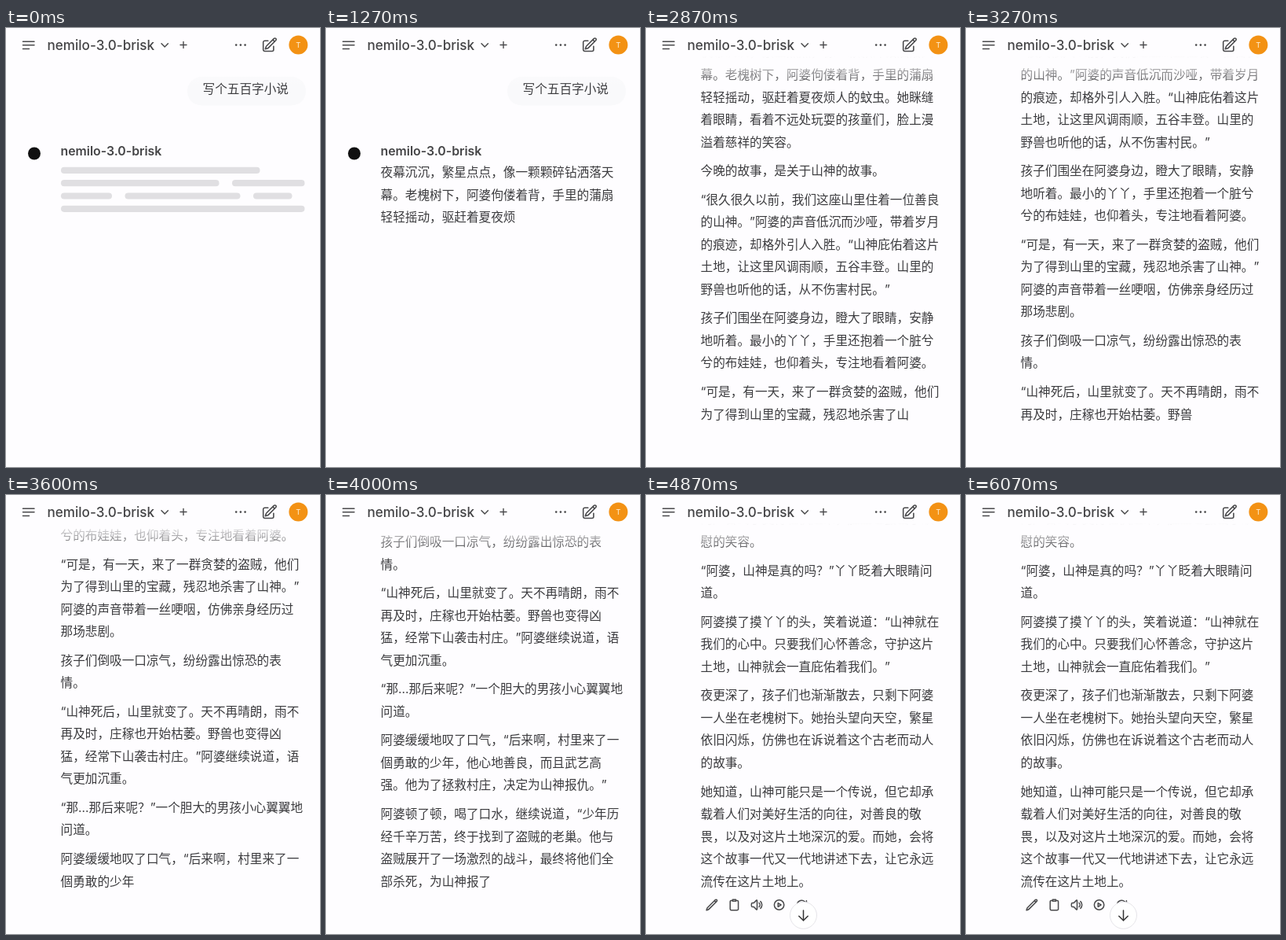
Recreate the animation shown at these times as an HTML page with a canvas. Size 400 by 558 pixels, loop 6140 ms.

```html
<!DOCTYPE html>
<html lang="zh-CN">
<head>
<meta charset="utf-8">
<title>Chat</title>
<style>
html, body { margin: 0; width: 100%; height: 100%; overflow: hidden; background: #fefdff; }
canvas { display: block; width: 400px; height: 558px; }
</style>
</head>
<body>
<canvas id="stage"></canvas>
<script>
const W = 400, H = 558, LOOP = 6140, TICK = 1000 / 15;
const BG = '#fefdff', INK = '#3b3b3e';
const MODEL = 'nemilo-3.0-brisk';
const SANS = 'Inter, "Noto Sans CJK SC", "Noto Sans CJK", sans-serif';
const LINE = 28.52, PARA = 36.6, FIRST = 184, LAST = 491.5;

const story = `夜幕沉沉，繁星点点，像一颗颗碎钻洒落天
幕。老槐树下，阿婆佝偻着背，手里的蒲扇
轻轻摇动，驱赶着夏夜烦人的蚊虫。她眯缝
着眼睛，看着不远处玩耍的孩童们，脸上漫
溢着慈祥的笑容。

今晚的故事，是关于山神的故事。

“很久很久以前，我们这座山里住着一位善良
的山神。”阿婆的声音低沉而沙哑，带着岁月
的痕迹，却格外引人入胜。“山神庇佑着这片
土地，让这里风调雨顺，五谷丰登。山里的
野兽也听他的话，从不伤害村民。”

孩子们围坐在阿婆身边，瞪大了眼睛，安静
地听着。最小的丫丫，手里还抱着一个脏兮
兮的布娃娃，也仰着头，专注地看着阿婆。

“可是，有一天，来了一群贪婪的盗贼，他们
为了得到山里的宝藏，残忍地杀害了山神。”
阿婆的声音带着一丝哽咽，仿佛亲身经历过
那场悲剧。

孩子们倒吸一口凉气，纷纷露出惊恐的表
情。

“山神死后，山里就变了。天不再晴朗，雨不
再及时，庄稼也开始枯萎。野兽也变得凶
猛，经常下山袭击村庄。”阿婆继续说道，语
气更加沉重。

“那...那后来呢？”一个胆大的男孩小心翼翼地
问道。

阿婆缓缓地叹了口气，“后来啊，村里来了一
個勇敢的少年，他心地善良，而且武艺高
强。他为了拯救村庄，决定为山神报仇。”

阿婆顿了顿，喝了口水，继续说道，“少年历
经千辛万苦，终于找到了盗贼的老巢。他与
盗贼展开了一场激烈的战斗，最终将他们全
部杀死，为山神报了仇。”

孩子们听得热血沸腾，恨不得自己就是那个
勇敢的少年。

“盗贼死后，山神也得以安息。他重新守护着
这片土地，山里又恢复了往日的生机。”阿婆
的声音终于变得轻快起来，脸上也露出了欣
慰的笑容。

“阿婆，山神是真的吗？”丫丫眨着大眼睛问
道。

阿婆摸了摸丫丫的头，笑着说道：“山神就在
我们的心中。只要我们心怀善念，守护这片
土地，山神就会一直庇佑着我们。”

夜更深了，孩子们也渐渐散去，只剩下阿婆
一人坐在老槐树下。她抬头望向天空，繁星
依旧闪烁，仿佛也在诉说着这个古老而动人
的故事。

她知道，山神可能只是一个传说，但它却承
载着人们对美好生活的向往，对善良的敬
畏，以及对这片土地深沉的爱。而她，会将
这个故事一代又一代地讲述下去，让它永远
流传在这片土地上。`;

// Lay out lines: text, index of the first character, vertical centre
const lines = [];
let total = 0, nextY = FIRST;
for (const para of story.split('\n\n')) {
  for (const text of para.split('\n')) {
    lines.push({ text, start: total, y: nextY });
    total += text.length;
    nextY += LINE;
  }
  nextY += PARA - LINE;
}

// Typing progress: up to each phrase, at which tick
const upTo = phrase => {
  const i = story.indexOf(phrase) + phrase.length;
  return story.slice(0, i).replace(/\n/g, '').length;
};
const progress = [
  [11, 0],
  [19, upTo('驱赶着夏夜烦')],
  [30, upTo('低沉而沙哑，带着岁')],
  [36, upTo('从不伤害村民。”')],
  [49, upTo('庄稼也开始枯萎。野兽')],
  [60, upTo('部杀死，为山神报了')],
  [68, upTo('笑着说道：“山')],
  [72, total]
];
const DONE = 73;

function typed(tick) {
  if (tick <= progress[0][0]) return 0;
  for (let i = 1; i < progress.length; i++) {
    const [a, n] = progress[i - 1], [b, m] = progress[i];
    if (tick <= b) return Math.round(n + (m - n) * (tick - a) / (b - a));
  }
  return total;
}

const icons = {
  compose: 'm16.862 4.487 1.687-1.688a1.875 1.875 0 1 1 2.652 2.652L10.582 16.07a4.5 4.5 0 0 1-1.897 1.13L6 18l.8-2.685a4.5 4.5 0 0 1 1.13-1.897l8.932-8.931Zm0 0L19.5 7.125M18 14v4.75A2.25 2.25 0 0 1 15.75 21H5.25A2.25 2.25 0 0 1 3 18.75V8.25A2.25 2.25 0 0 1 5.25 6H10',
  pencil: 'm16.862 4.487 1.687-1.688a1.875 1.875 0 1 1 2.652 2.652L6.832 19.82a4.5 4.5 0 0 1-1.897 1.13l-2.685.8.8-2.685a4.5 4.5 0 0 1 1.13-1.897L16.863 4.487Zm0 0L19.5 7.125',
  clipboard: 'M8.3 4H6.5a2 2 0 0 0-2 2v13.5a2.25 2.25 0 0 0 2.25 2.25h10.5a2.25 2.25 0 0 0 2.25-2.25V6a2 2 0 0 0-2-2h-1.8M9 2.25h6v3H9Z',
  speaker: 'M19.114 5.636a9 9 0 0 1 0 12.728M16.463 8.288a5.25 5.25 0 0 1 0 7.424M6.75 8.25l4.72-4.72a.75.75 0 0 1 1.28.53v15.88a.75.75 0 0 1-1.28.53l-4.72-4.72H4.5a2 2 0 0 1-1.9-1.35a9 9 0 0 1 0-4.8a2 2 0 0 1 1.9-1.35Z',
  play: 'M21 12a9 9 0 1 1-18 0a9 9 0 1 1 18 0ZM10 8.5v7l5.5-3.5Z',
  redo: 'M16.023 9.348h4.992M2.985 19.644v-4.992h4.992m-4.993 0 3.181 3.183a8.25 8.25 0 0 0 13.803-3.7M4.031 9.865a8.25 8.25 0 0 1 13.803-3.7l3.181 3.182m0-4.991v4.99'
};
for (const k in icons) icons[k] = new Path2D(icons[k]);

const canvas = document.getElementById('stage');
const ratio = window.devicePixelRatio || 1;
canvas.width = W * ratio;
canvas.height = H * ratio;
const c = canvas.getContext('2d');
c.lineCap = c.lineJoin = 'round';

function label(text, x, y, font, color = INK, align = 'left') {
  c.font = font + ' ' + SANS;
  c.fillStyle = color;
  c.textAlign = align;
  c.fillText(text, x, y);
}

function disc(x, y, r, color) {
  c.fillStyle = color;
  c.beginPath();
  c.arc(x, y, r, 0, Math.PI * 2);
  c.fill();
}

function pill(x, y, w, h, color) {
  c.fillStyle = color;
  c.beginPath();
  c.roundRect(x, y, w, h, h / 2);
  c.fill();
}

function stroke(points, width, color = '#4a4a4c') {
  c.strokeStyle = color;
  c.lineWidth = width;
  c.beginPath();
  points.forEach(([x, y], i) => i ? c.lineTo(x, y) : c.moveTo(x, y));
  c.stroke();
}

function icon(name, x, y, scale, width) {
  c.save();
  c.translate(x, y);
  c.scale(scale, scale);
  c.translate(-12, -12);
  c.strokeStyle = '#4a4a4c';
  c.lineWidth = width;
  c.stroke(icons[name]);
  c.restore();
}

function skeleton(t) {
  const phase = t / 2000 % 1;
  c.globalAlpha = 0.75 + 0.25 * Math.cos(phase * Math.PI * 2);
  const rows = [[[70, 323.5]], [[70, 271.5], [288, 380.5]],
    [[70, 135], [151.5, 298.5], [315, 364.5]], [[70, 380.5]]];
  rows.forEach((row, i) => row.forEach(([a, b]) =>
    pill(a, 176.8 + i * 16.3, b - a, 8.2, '#e0dfe2')));
  c.globalAlpha = 1;
}

function chat(t, tick) {
  const count = typed(tick);
  const shown = lines.filter(l => l.start < count);
  const scroll = shown.length ? Math.max(0, shown[shown.length - 1].y - LAST) : 0;
  c.save();
  c.translate(0, -scroll);
  pill(231, 62, 151, 36.5, '#f9f9fb');
  label('写个五百字小说', 250.5, 82.6, '15.63px');
  disc(36, 159.5, 8, '#111');
  label(MODEL, 69.5, 162.3, '600 15.85px', '#444446');
  if (!count) skeleton(t);
  for (const l of shown) {
    if (l.y - scroll > 20) label(l.text.slice(0, count - l.start), 69.5, l.y + 5.1, '15.63px');
  }
  c.restore();
}

function header() {
  const fade = c.createLinearGradient(0, 36, 0, 74);
  fade.addColorStop(0, BG);
  fade.addColorStop(1, 'rgba(254,253,255,0)');
  c.fillStyle = fade;
  c.fillRect(0, 0, W, 74);

  stroke([[21.5, 17.2], [36, 17.2]], 1.5);
  stroke([[21.5, 21.8], [36, 21.8]], 1.5);
  stroke([[21.5, 26.4], [29.5, 26.4]], 1.5);
  label(MODEL, 52.5, 27.6, '500 17.1px', '#444446');
  stroke([[198, 19.8], [202.2, 24], [206.4, 19.8]], 1.5);
  stroke([[222, 21.5], [230, 21.5]], 1.4);
  stroke([[226, 17.5], [226, 25.5]], 1.4);
  for (const x of [293.2, 298.9, 304.6]) disc(x, 21.6, 1.3, '#4a4a4c');
  icon('compose', 335.6, 21.5, 0.88, 1.8);
  disc(372.4, 21.6, 12, '#f39214');
  label('T', 372.4, 25, '9.5px', '#fff3dc', 'center');
}

function actions() {
  ['pencil', 'clipboard', 'speaker', 'play', 'redo'].forEach((name, i) =>
    icon(name, 83.8 + i * 28.6, 521, 0.69, 2.2));
  disc(200.5, 534.3, 17, '#fff');
  c.strokeStyle = '#e6e5e9';
  c.lineWidth = 1;
  c.stroke();
  stroke([[200.5, 528], [200.5, 540.8]], 1.5, '#333');
  stroke([[194.8, 535.2], [200.5, 540.8], [206.2, 535.2]], 1.5, '#333');
}

function draw(now) {
  const t = now % LOOP;
  const tick = Math.floor(t / TICK + 0.1);
  c.setTransform(ratio, 0, 0, ratio, 0, 0);
  c.fillStyle = BG;
  c.fillRect(0, 0, W, H);
  chat(tick * TICK, tick);
  if (tick >= DONE) actions();
  header();
}

const begin = performance.now();
function loop() {
  draw(performance.now() - begin);
  requestAnimationFrame(loop);
}
loop();
</script>
</body>
</html>
```
